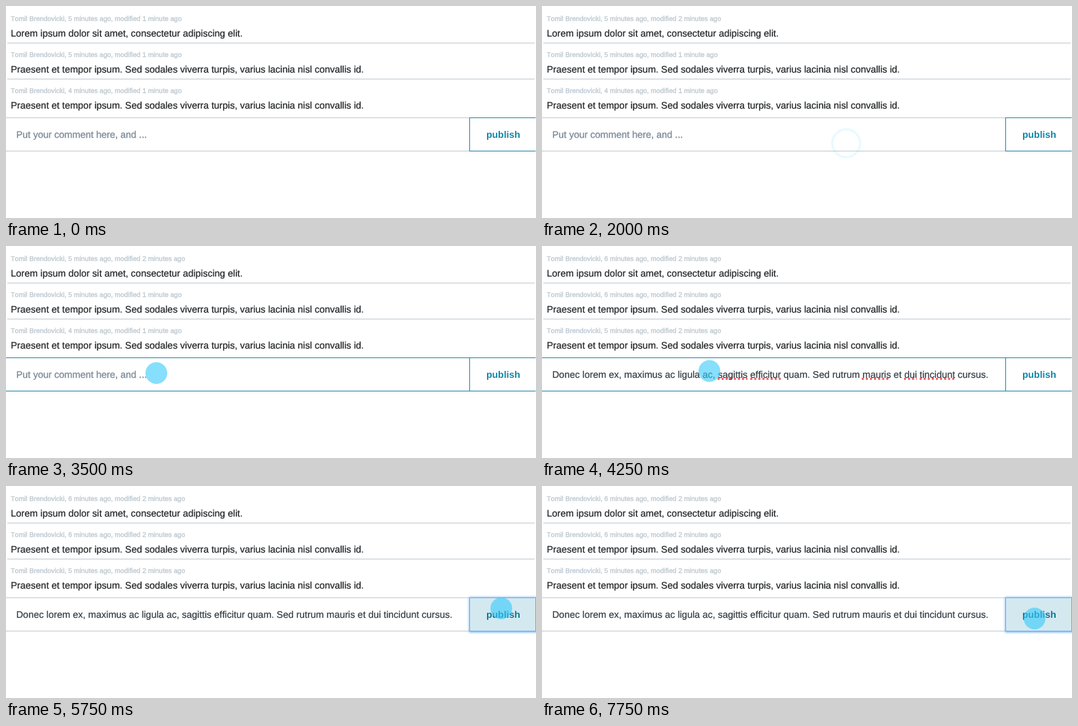
Animation, 779 px wide and 312 px high, one loop 8 s. Source, as an HTML page:

```html
<!DOCTYPE html>
<html lang="en">
<head>
<meta charset="utf-8">
<title>Comment form</title>
<style>
  html, body { margin: 0; width: 779px; height: 312px; overflow: hidden; background: #fff; }
  body {
    position: relative; font: 14px/16px "Liberation Sans", Arial, sans-serif; color: #1d1f21;
    font-kerning: none; font-variant-ligatures: none; text-rendering: geometricPrecision;
    -webkit-text-stroke: .2px; white-space: pre;
  }
  div { position: absolute; box-sizing: border-box; }
  .comment { left: 2px; width: 775px; height: 53px; }
  .comment + .comment { border-top: 1px solid #c0c9d0; margin-top: -1px; height: 54px; }
  .meta { left: 5px; bottom: 30px; font-size: 10px; line-height: 11px; color: #bcc8d0; -webkit-text-stroke: .35px; }
  .body { left: 5px; bottom: 7px; }
  #field { left: 0; top: 164px; width: 682px; height: 50px; border: solid #bec8cf; border-width: 1px 0; }
  #field.focus { border-color: #1b85a5; }
  #field.fading { border-color: #5ba2bd #6f9bab #6f9bab; }
  #text { left: 15px; top: 16px; color: #303a43; }
  .empty #text { color: #7d8c99; -webkit-text-stroke: .35px; }
  .checked i { text-decoration: underline dotted #f0696c 2.5px; text-underline-offset: 0; text-decoration-skip-ink: none; }
  i { font-style: normal; }
  #caret { top: 16px; width: 1px; height: 17px; background: #111; }
  #button {
    left: 681px; top: 164px; width: 98px; height: 50px; border: 1px solid #1b85a5; border-right-color: transparent;
    color: #1087a9; font-weight: bold; -webkit-text-stroke: 0;
  }
  #button.hover { background: #d3e9ef; color: #0f7695; }
  #button.pressed { background: #a9d4e2; color: #0a5d78; }
  #button.focus { border-color: #6caaf0; box-shadow: 0 0 3px 1.5px #72b1f6; }
  #label { left: 24px; top: 16px; }
  #pointer { border-radius: 50%; }
</style>
</head>
<body>
<div id="field"><div id="text"></div><div id="caret"></div></div>
<div id="button"><div id="label">publish</div></div>
<div id="pointer"></div>
<script>
const LOOP = 8000, STEP = 250, DISC = 16;
const AUTHOR = "Tomil Brendovicki";
const PLACEHOLDER = "Put your comment here, and ...";
const DRAFT = "Donec lorem ex, maximus ac ligula ac, <i>sagittis</i> <i>efficitur</i> quam. " +
  "Sed rutrum <i>mauris</i> et <i>dui</i> <i>tincidunt</i> cursus.";
const PRAESENT = "Praesent et tempor ipsum. Sed sodales viverra turpis, varius lacinia nisl convallis id.";
const COMMENTS = ["Lorem ipsum dolor sit amet, consectetur adipiscing elit.", PRAESENT, PRAESENT];

// Pointer positions: start time, centre x, y, radius (larger than DISC is a click ripple)
const POINTER = [
  [1000, 794, 74, DISC], [1250, 515, 192, DISC],
  [1500, 505, 212, 21], [1750, 505, 212, 22], [2000, 447, 202, 22],
  [2250, 265, 191, DISC], [2500, 221, 187, DISC],
  [2750, 221, 203, 21], [3000, 221, 203, 22], [3250, 221, 203, 23],
  [3500, 221, 187, DISC], [4250, 246, 184, DISC], [4500, 715, 181, DISC], [4750, 728, 180, DISC],
  [5000, 728, 196, 21], [5250, 728, 196, 22], [5500, 728, 196, 23],
  [5750, 728, 180, DISC], [7500, 728, 182, DISC], [7750, 724, 195, DISC]
];
const RIPPLE_ALPHA = { 21: .32, 22: .13, 23: .05 };

const $ = id => document.getElementById(id);
const field = $("field"), text = $("text"), caret = $("caret"), button = $("button"), pointer = $("pointer");

const metas = COMMENTS.map((body, i) => {
  const row = document.createElement("div");
  row.className = "comment";
  row.style.top = 2 + i * 53 + "px";
  row.innerHTML = `<div class="meta"></div><div class="body">${body}</div>`;
  document.body.insertBefore(row, field);
  return row.firstChild;
});

const minutes = n => `${n} minute${n > 1 ? "s" : ""} ago`;
const between = (t, from, to) => t >= from && t < to;

function drawPointer(t) {
  const pose = POINTER.filter(p => p[0] <= t).pop();
  pointer.hidden = !pose;
  if (!pose) return;
  const [, x, y, r] = pose, ripple = r > DISC;
  Object.assign(pointer.style, {
    left: x - r + "px", top: y - r + "px", width: 2 * r + "px", height: 2 * r + "px",
    background: ripple ? "none" : "rgba(53,201,250,.6)",
    border: ripple ? `3px solid rgba(60,215,255,${RIPPLE_ALPHA[r]})` : "none"
  });
}

function draw(t) {
  const pasted = t >= 3750;
  metas.forEach((meta, i) => {
    const age = (i < 2 ? 5 : 4) + pasted;
    const edited = pasted || (i === 0 && t >= 500) ? 2 : 1;
    meta.textContent = `${AUTHOR}, ${minutes(age)}, modified ${minutes(edited)}`;
  });

  field.className = [
    pasted ? "" : "empty",
    between(t, 2750, 5000) ? "focus" : between(t, 5000, 5250) ? "fading" : "",
    between(t, 3750, 5000) ? "checked" : ""
  ].join(" ");
  text.innerHTML = pasted ? DRAFT : PLACEHOLDER;
  caret.style.left = pasted ? "656px" : "15px";
  caret.hidden = !(between(t, 2750, 3250) || between(t, 3750, 4250) || between(t, 4750, 5000));

  button.className = [
    t >= 4500 ? "hover" : "",
    between(t, 5000, 5250) ? "pressed" : "",
    t >= 5000 ? "focus" : ""
  ].join(" ");
  drawPointer(t);
}

let shown = -1;
function tick() {
  const t = Math.floor(performance.now() % LOOP / STEP) * STEP;
  if (t !== shown) draw(shown = t);
  requestAnimationFrame(tick);
}
tick();
</script>
</body>
</html>
```
